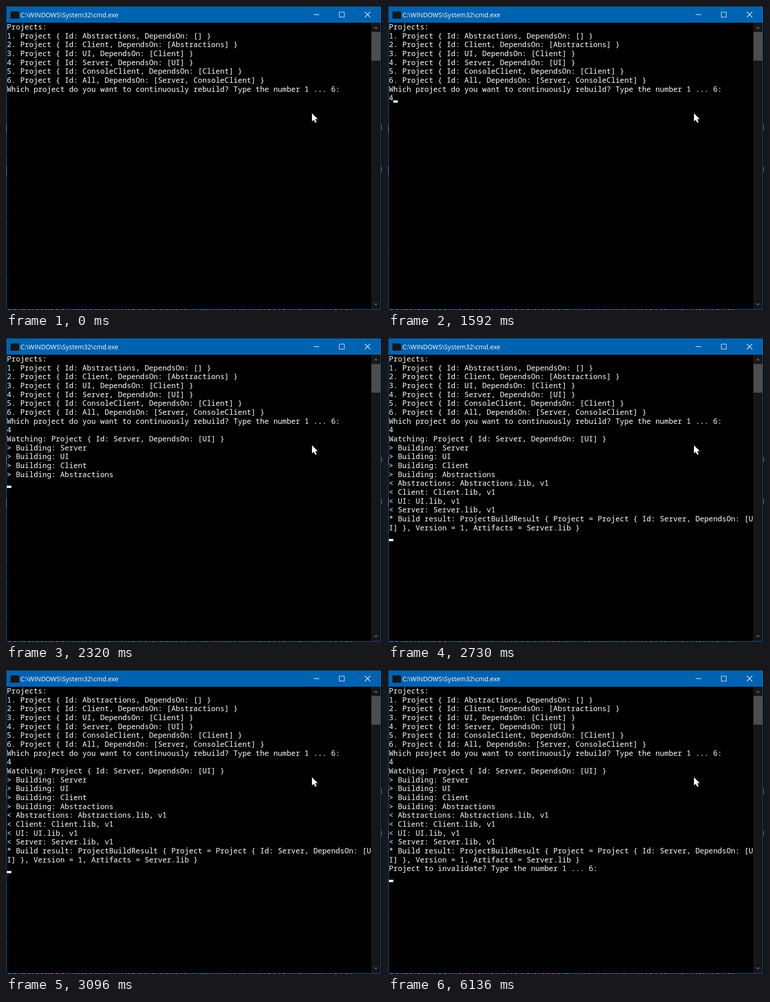
These frames come from a looping animation (832 by 673 pixels, 8000 ms). An HTML page with a canvas:

```html
<!DOCTYPE html>
<html lang="en">
<head>
<meta charset="utf-8">
<title>Console</title>
<style>
html, body { margin: 0; width: 100%; height: 100%; overflow: hidden; background: #000; }
canvas { display: block; }
</style>
</head>
<body>
<canvas id="stage" width="832" height="673"></canvas>
<script>
const ctx = document.getElementById('stage').getContext('2d');
const LOOP = 8000;
const BLUE = '#0063b1';
const BORDER = '#1870b5';
const CELL = { x: 2, y: 37, w: 9.828, h: 19.66, baseline: 15 };

// Lines appear in batches: [start time, lines, cursor column, or -1 when hidden]
const batches = [
  [0, [
    'Projects:',
    '1. Project { Id: Abstractions, DependsOn: [] }',
    '2. Project { Id: Client, DependsOn: [Abstractions] }',
    '3. Project { Id: UI, DependsOn: [Client] }',
    '4. Project { Id: Server, DependsOn: [UI] }',
    '5. Project { Id: ConsoleClient, DependsOn: [Client] }',
    '6. Project { Id: All, DependsOn: [Server, ConsoleClient] }',
    'Which project do you want to continuously rebuild? Type the number 1 ... 6:'
  ], -1],
  [500, ['4'], 1],
  [2320, [
    'Watching: Project { Id: Server, DependsOn: [UI] }',
    '> Building: Server',
    '> Building: UI',
    '> Building: Client',
    '> Building: Abstractions'
  ], 0],
  [2530, ['< Abstractions: Abstractions.lib, v1', '< Client: Client.lib, v1'], 0],
  [2730, [
    '< UI: UI.lib, v1',
    '< Server: Server.lib, v1',
    '* Build result: ProjectBuildResult { Project = Project { Id: Server, DependsOn: [U',
    'I] }, Version = 1, Artifacts = Server.lib }'
  ], 0],
  [3340, ['Project to invalidate? Type the number 1 ... 6:'], 0]
];

function rect(color, x, y, w, h) {
  ctx.fillStyle = color;
  ctx.fillRect(x, y, w, h);
}

function stroke(color, width, ...lines) {
  ctx.strokeStyle = color;
  ctx.lineWidth = width;
  ctx.beginPath();
  for (const points of lines) {
    points.forEach(([x, y], i) => i ? ctx.lineTo(x, y) : ctx.moveTo(x, y));
  }
  ctx.stroke();
}

function drawBackdrop() {
  rect('#000', 0, 0, 832, 673);
  for (const y of [166, 186, 232, 336, 400, 430, 478, 494, 540, 557, 602, 618]) {
    rect('#28455f', 0, y, 1, 2);
  }
  rect('#536d82', 0, 263, 1, 18);
  rect('#536d82', 0, 355, 1, 19);
  rect('#7c98b5', 831, 263, 1, 12);
  rect('#7c98b5', 831, 356, 1, 12);

  // Tops of the letters hidden behind the window
  let seed = 7;
  for (let x = 5; x < 765;) {
    seed = (seed * 16807) % 2147483647;
    const w = 2 + seed % 5;
    rect(seed % 3 ? '#85807c' : '#454545', x, 672, w, 1);
    x += w + 2 + seed % 5;
  }
}

function drawWindow() {
  rect(BORDER, 1, 1, 829, 671);
  rect(BLUE, 2, 2, 827, 35);
  rect('#000', 2, 37, 806, 634);
  rect('#171717', 808, 37, 21, 634);
  rect('#4d4d4d', 808.5, 57.5, 20, 63.5);
  stroke('#858585', 1.2,
    [[815, 50], [818.5, 46.5], [822, 50]],
    [[815, 658.5], [818.5, 662], [822, 658.5]]);

  rect('#161616', 10, 12, 19, 16);
  ctx.fillStyle = '#fff';
  ctx.font = '14.12px "Open Sans", "Noto Sans", sans-serif';
  ctx.fillText('C:\\WINDOWS\\System32\\cmd.exe', 32, 25);

  rect('#fff', 681, 18.5, 12, 1.2);
  ctx.strokeStyle = '#fff';
  ctx.lineWidth = 1;
  ctx.strokeRect(737.5, 13.5, 11, 11);
  stroke('#fff', 1.2, [[794, 13], [806, 25]], [[806, 13], [794, 25]]);
}

function drawRow(text, row) {
  const y = CELL.y + CELL.baseline + row * CELL.h;
  [...text].forEach((char, col) => ctx.fillText(char, CELL.x + col * CELL.w, y));
}

function drawConsole(time) {
  const shown = batches.filter(([start]) => start <= time);
  const lines = shown.flatMap(([, text]) => text);
  ctx.fillStyle = '#fff';
  ctx.font = '500 16.38px "Noto Sans Mono", "DejaVu Sans Mono", monospace';
  lines.forEach(drawRow);

  const col = shown[shown.length - 1][2];
  if (col < 0) return;
  const row = col ? lines.length - 1 : lines.length;
  const bottom = CELL.y + (row + 1) * CELL.h;
  rect('#fff', CELL.x + col * CELL.w, bottom - 5, CELL.w, 5);
}

function drawPointer() {
  ctx.fillStyle = '#fff';
  ctx.fill(new Path2D('M677 237.5V255.5L681 251.8L684.2 258.6L687.2 257.2L684.2 250.6H689.8Z'));
}

function frame(now) {
  drawBackdrop();
  drawWindow();
  drawConsole(now % LOOP);
  drawPointer();
  requestAnimationFrame(now => frame(Math.max(0, now - origin)));
}

const origin = performance.now();
frame(0);
</script>
</body>
</html>
```
